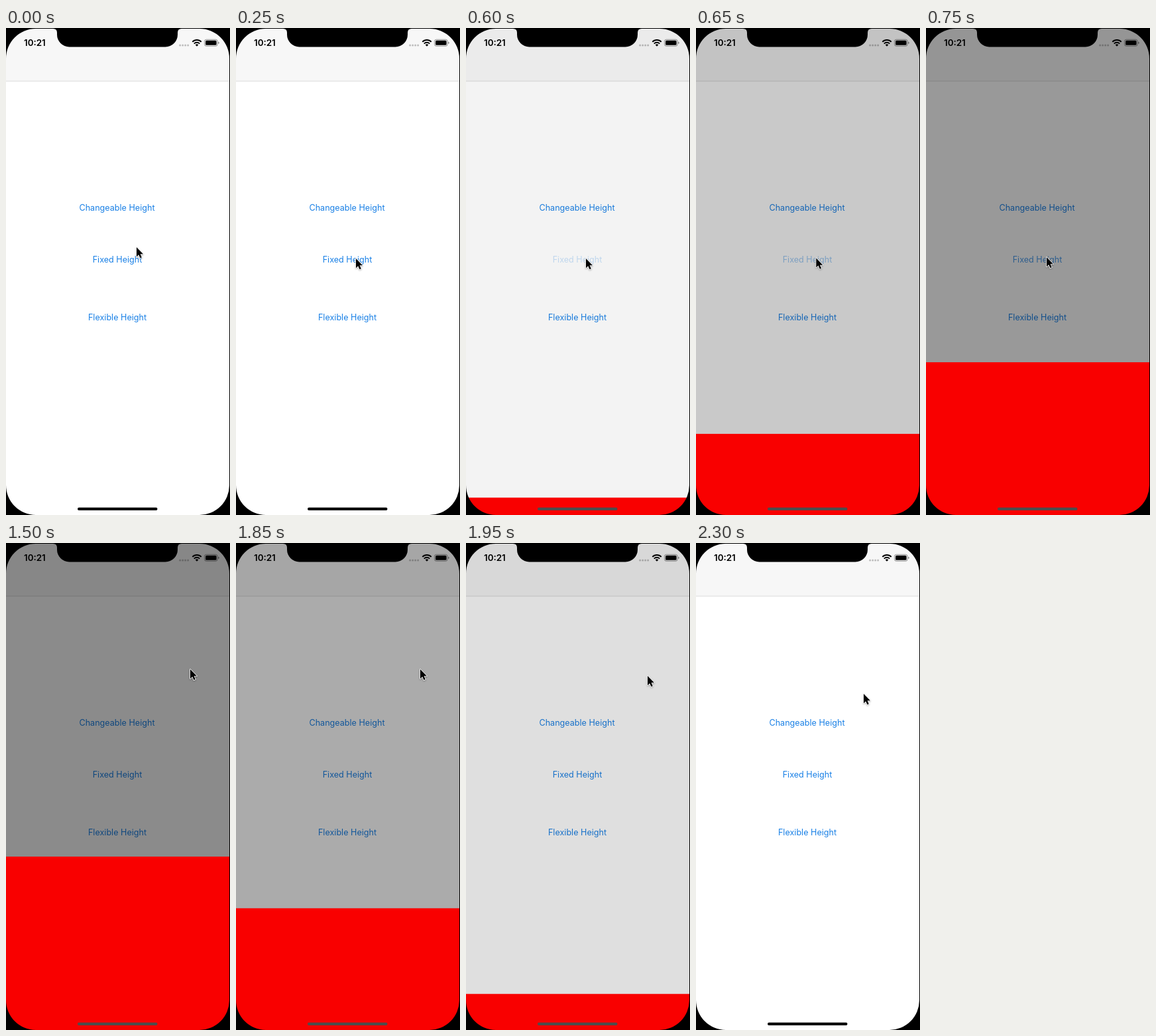
Write an HTML page that moves like this. It is 338x733 px and loops after 2.35 s.

```html
<!DOCTYPE html>
<html lang="en">
<head>
<meta charset="utf-8">
<title>Bottom sheet demo</title>
<style>
  html, body { margin: 0; width: 100%; height: 100%; overflow: hidden; background: #000; }
  svg { display: block; width: 338px; height: 733px; }
  text { font-family: Inter, "Liberation Sans", sans-serif; }
  .link { font-size: 12.6px; fill: #1a80e6; text-anchor: middle; }
  .clock { font-size: 13.4px; font-weight: 600; }
</style>
</head>
<body>
<svg viewBox="0 0 338 733">
  <rect width="338" height="733" fill="#fff"/>
  <rect width="338" height="80" fill="#f7f7f7"/>
  <rect y="79.5" width="338" height="1" fill="#dcdcdc"/>
  <text class="link" x="167.5" y="275">Changeable Height</text>
  <text class="link" x="168" y="353" id="fixed">Fixed Height</text>
  <text class="link" x="168" y="440">Flexible Height</text>
  <rect id="dim" width="338" height="733"/>
  <rect id="sheet" width="338" height="733" fill="#f90000"/>

  <text class="clock" x="27" y="27.3">10:21</text>
  <g fill-opacity=".23">
    <circle cx="262.6" cy="26" r="1.5"/>
    <circle cx="266.6" cy="26" r="1.5"/>
    <circle cx="270.6" cy="26" r="1.5"/>
    <circle cx="274.6" cy="26" r="1.5"/>
  </g>
  <g fill="none" stroke="#000" stroke-width="2">
    <path d="M281.3 20.9a9.3 9.3 0 0 1 13.4 0"/>
    <path d="M283.8 23.6a5.9 5.9 0 0 1 8.4 0"/>
  </g>
  <path d="M285.7 25.3a3.3 3.3 0 0 1 4.6 0L288 27.7z"/>
  <rect x="299.5" y="17.3" width="19.6" height="10" rx="2.8" fill="none" stroke="#000" stroke-opacity=".4"/>
  <rect x="301" y="18.8" width="16.6" height="7" rx="1.6"/>
  <path d="M320.2 20.6q1.5 .5 1.5 1.7t-1.5 1.7z" fill-opacity=".45"/>

  <rect id="home" x="108" y="721.8" width="120.5" height="4.2" rx="2.1"/>
  <path fill-rule="evenodd" d="M0 0H338V733H0z
    M45 1H71Q77 1 77 7V10A18.5 18.5 0 0 0 95.5 28.5H240.5A18.5 18.5 0 0 0 259 10V7Q259 1 265 1H292
    A45 45 0 0 1 337 46V688A45 45 0 0 1 292 733H45A45 45 0 0 1 0 688V46A45 45 0 0 1 45 1z"/>
  <path id="cursor" d="M0 0V14.2L3.2 11.2 5.5 16.3 7.8 15.3 5.6 10.3H10z"
    stroke="#fff" stroke-width="1.6" stroke-linejoin="round" paint-order="stroke"
    style="filter: drop-shadow(0 1px 1px rgba(0,0,0,.3))"/>
</svg>
<script>
const LOOP = 2350, STEP = 50;
const SHEET = 261, DIM = 0.455;
const el = id => document.getElementById(id);
const fixed = el('fixed'), dim = el('dim'), sheet = el('sheet'), home = el('home'), cursor = el('cursor');

// Critically damped spring from 0 to 1; rate is per second.
function spring(t, start, rate) {
  const x = Math.max(0, t - start) * rate / 1000;
  return 1 - (1 + x) * Math.exp(-x);
}

// Keys are [time, ...values], joined by straight lines.
function track(keys, t) {
  let i = 1;
  while (i < keys.length - 1 && t > keys[i][0]) i++;
  const [t0, ...a] = keys[i - 1], [t1, ...b] = keys[i];
  const k = Math.min(1, Math.max(0, (t - t0) / (t1 - t0)));
  return a.map((v, n) => v + (b[n] - v) * k);
}

const pointer = [
  [0, 197, 330], [100, 190, 339], [250, 181, 347], [600, 181, 347],
  [750, 182, 345], [850, 205, 305], [1000, 270, 208], [1300, 278, 190],
  [1850, 278, 190], [1950, 274, 200], [2100, 264, 214], [2300, 253, 227]
];
const press = [[450, 1], [550, 0.2], [590, 0.2], [810, 1]];

function draw(t) {
  const closing = t >= 1850;
  const shown = closing ? 1 - spring(t, 1791, 18.5) : spring(t, 574.5, 20.9);
  const shade = closing ? 1 - spring(t, 1782, 15.1) : shown;
  const height = SHEET * shown;
  const [x, y] = track(pointer, t);
  sheet.setAttribute('y', height < 0.5 ? 733 : 733 - height);
  dim.setAttribute('fill-opacity', DIM * shade);
  home.setAttribute('fill', height > 8 ? '#4d4d4d' : '#000');
  fixed.setAttribute('opacity', track(press, t)[0]);
  cursor.setAttribute('transform', `translate(${x} ${y})`);
}

const begin = performance.now();
function tick() {
  const t = (performance.now() - begin) % LOOP;
  draw(Math.floor(t / STEP) * STEP);
  requestAnimationFrame(tick);
}
tick();
</script>
</body>
</html>
```
